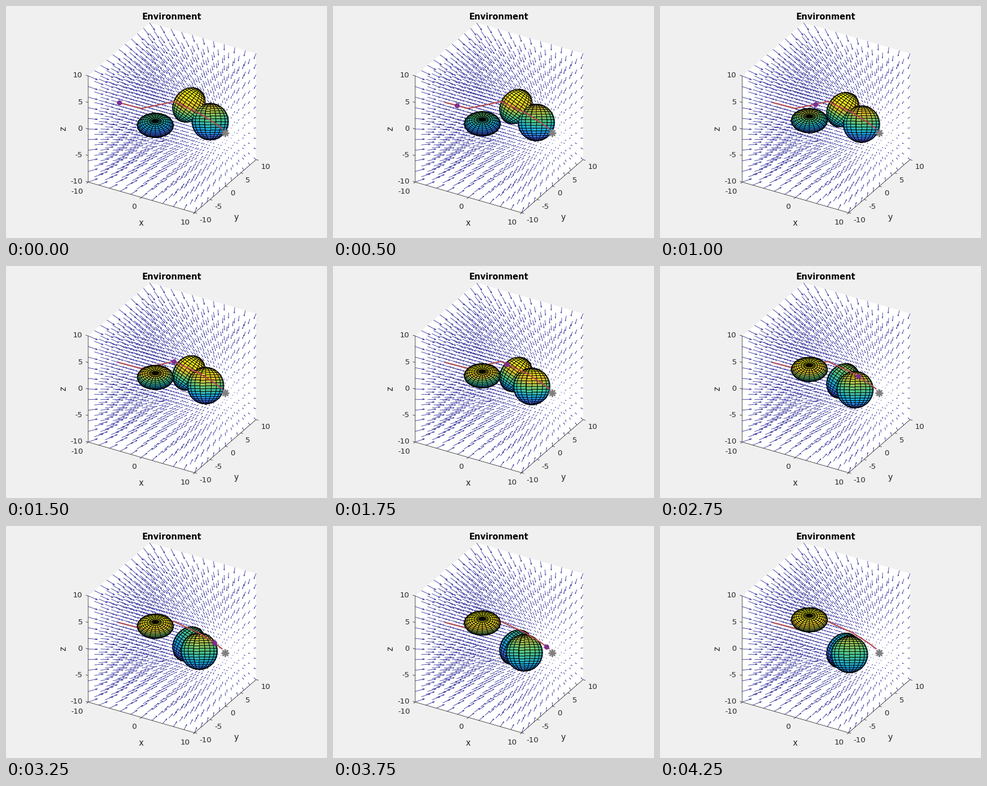
A matplotlib script for the animation above (4.5 s loop, 570 px wide and 413 px high).

```python
import numpy as np
import matplotlib.pyplot as plt
from matplotlib.animation import FuncAnimation
from matplotlib.collections import LineCollection, PolyCollection
from matplotlib.colors import LinearSegmentedColormap

W, H, DPI = 570, 413, 100
PX = 72 / DPI  # one pixel in points
INK = "#262626"

# Orthographic camera: azimuth 30, elevation 30 degrees
SCALE = 10.91
CENTER = np.array([295, 199])
C30 = np.sqrt(3) / 2
RIGHT = np.array([C30, 0.5, 0])
UP = np.array([-0.25, C30 / 2, C30])
VIEW = np.cross(RIGHT, UP)

PARULA = LinearSegmentedColormap.from_list(
    "parula", ["#3e26a8", "#446bff", "#14a8de", "#51c883", "#e2c02a", "#f9fb15"])

# centre, velocity per step, semi-axes, pole angle off the view axis, roll
BALLS = [
    ((2, 2, 2), (0, 0, -0.3), (2.5, 3, 3), 90, 35),
    ((6, 2, 0), (0, -0.3, 0), (3, 3, 3), 90, 0),
    ((-2, -2, -1), (0, 0, 0.3), (2.97, 1.95, 2.9), 14, 0),
]
GOAL = np.array([10, 0, 0])
# step, x, y of the bends along the route
BENDS = np.array([(0, 200.5, 172), (2, 240, 182.3), (3, 276, 175),
                  (5, 298, 170), (9, 342.5, 190.5), (12, 370, 208),
                  (15, 383.5, 218.5)])


def project(p):
    p = np.asarray(p, float)
    return CENTER + SCALE * np.stack([p @ RIGHT, -(p @ UP)], axis=-1)


def unit_sphere(n=20):
    lat = np.linspace(-np.pi / 2, np.pi / 2, n + 1)[:, None]
    lon = np.linspace(-np.pi, np.pi, n + 1)[None, :]
    p = np.stack([np.cos(lat) * np.cos(lon), np.cos(lat) * np.sin(lon),
                  np.sin(lat) + 0 * lon], axis=-1)
    quads = np.stack([p[:-1, :-1], p[:-1, 1:], p[1:, 1:], p[1:, :-1]], axis=2)
    return quads.reshape(-1, 4, 3)


def ball_mesh(axes, tilt, roll):
    """All faces around the origin, and which of them face the camera."""
    tilt, roll = np.radians([tilt, roll])
    across = np.cos(roll) * RIGHT - np.sin(roll) * UP
    along = np.cos(roll) * UP + np.sin(roll) * RIGHT
    pole = np.cos(tilt) * VIEW + np.sin(tilt) * along
    basis = np.array([across, np.cross(pole, across), pole])
    quads = unit_sphere()
    normals = (quads.mean(axis=1) / axes) @ basis
    return (quads * axes) @ basis, normals @ VIEW > -0.02


MESHES = [ball_mesh(np.array(b[2]), *b[3:]) for b in BALLS]


def paint(coll, faces, lo, hi):
    faces = faces[np.argsort(faces.mean(axis=1) @ VIEW)]
    coll.set_verts(project(faces))
    coll.set_facecolor(PARULA((faces[:, 0, 2] - lo) / (hi - lo)))


def field_lines():
    g = np.arange(-10, 11, 2)
    p = np.stack(np.meshgrid(g, g, g), axis=-1).reshape(-1, 3).astype(float)
    pull = GOAL - p
    away = p - np.array([-3, -2.5, -4])
    dist = np.linalg.norm(away, axis=1, keepdims=True)
    v = pull + np.where(dist < 2.3, 12 * away / dist ** 2, 0)
    v *= 1.65 / np.linalg.norm(pull, axis=1).max()
    tail, tip = project(p), project(p + v)
    d = tip - tail
    side = 0.07 * np.stack([-d[:, 1], d[:, 0]], axis=1)
    neck = tip - 0.22 * d
    return (list(np.stack([tail, tip], axis=1))
            + list(np.stack([neck + side, tip, neck - side], axis=1)))


def label(x, y, text, size=13.33, ha="center", color=INK, **kw):
    ax.text(x, y, text, fontsize=size * PX, ha=ha, color=color,
            va="center" if "rotation" in kw else "center_baseline", **kw)


def draw_axes():
    e = 10
    box = project([(-e, -e, e), (-e, -e, -e), (e, -e, -e),
                   (e, e, -e), (e, e, e), (-e, e, e)])
    ax.add_collection(PolyCollection([box], facecolors="white",
                                     edgecolors="none", zorder=0))
    lines = [box[:4]]

    def tick(start, step, t, dx, dy, ha):
        start = np.array(start)
        lines.append(project([start, start + step]))
        x, y = project(start)
        label(x + dx, y + dy, str(t), ha=ha)

    for t in (-10, 0, 10):
        tick((t, -e, -e), (0, -0.5, 0), t, -8.5, 15.5, "right")
    for t in (-10, -5, 0, 5, 10):
        tick((e, t, -e), (0.45, 0, 0), t, 8.5, 11.5, "left")
        tick((-e, -e, t), (-0.45, 0, 0), t, -10, -2, "right")
    ax.add_collection(LineCollection(lines, colors=INK, linewidths=0.8 * PX,
                                     zorder=2))
    label(294.5, 18, "Environment", 14.67, weight="bold", color="black")
    label(239.5, 385, "x", 14.67)
    label(408.5, 375, "y", 14.67)
    label(101.5, 218, "z", 14.67, rotation=90)


def draw_goal():
    a = np.arange(4) * np.pi / 4
    r = 7 * np.stack([np.cos(a), np.sin(a)], axis=1)
    c = project(GOAL)
    ax.add_collection(LineCollection(np.stack([c - r, c + r], axis=1),
                                     colors="#808080", linewidths=3 * PX,
                                     zorder=7))


fig = plt.figure(figsize=(W / DPI, H / DPI), dpi=DPI, facecolor="#f0f0f0")
ax = fig.add_axes([0, 0, 1, 1])
ax.set_xlim(0, W)
ax.set_ylim(H, 0)
ax.axis("off")

draw_axes()
draw_goal()
ax.add_collection(LineCollection(field_lines(), colors="#30309a",
                                 linewidths=0.85 * PX, zorder=1))

style = dict(edgecolors="black", linewidths=0.9 * PX)
spheres = PolyCollection([], zorder=3, **style)
disc = PolyCollection([], zorder=6, **style)
ax.add_collection(spheres)
ax.add_collection(disc)
ax.plot(BENDS[:, 1], BENDS[:, 2], color="#b24a50", lw=2.2 * PX, zorder=4)
dot, = ax.plot([], [], "o", color="#7e2f8e", ms=9 * PX, mew=0, zorder=5)


def update(i):
    step = max(i - 1, 0)  # the first pose is held for two ticks
    moved = [mesh + np.add(b[0], step * np.array(b[1]))
             for (mesh, _), b in zip(MESHES, BALLS)]
    z = np.concatenate(moved)[..., 2]
    lo, hi = z.min(), z.max()
    faces = [m[front] for m, (_, front) in zip(moved, MESHES)]
    paint(spheres, np.concatenate(faces[:2]), lo, hi)
    paint(disc, faces[2], lo, hi)
    # the dot vanishes once the route is finished
    dot.set_visible(step <= BENDS[-1, 0])
    dot.set_data([np.interp(step, BENDS[:, 0], BENDS[:, 1])],
                 [np.interp(step, BENDS[:, 0], BENDS[:, 2])])
    return spheres, disc, dot


anim = FuncAnimation(fig, update, frames=18, interval=250, repeat=True,
                     repeat_delay=0, init_func=lambda: update(0))
plt.show()
```
